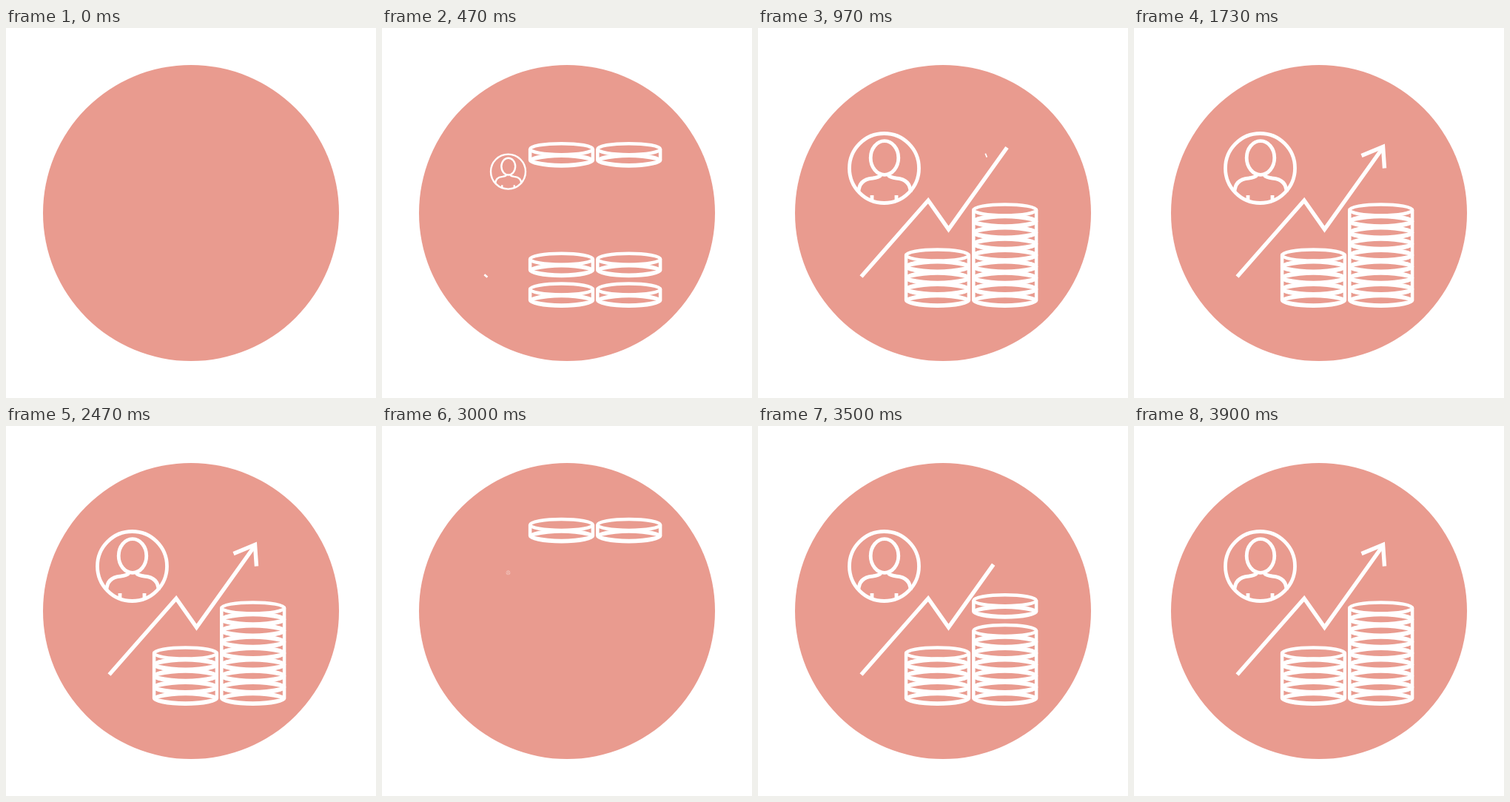
An HTML page with a canvas for the animation above (3.93 s loop, 500x500 px).

```html
<!DOCTYPE html>
<html>
<head>
<meta charset="utf-8">
<title>Growth icon</title>
<style>
html, body { margin: 0; height: 100%; overflow: hidden; background: #fff; }
canvas { display: block; }
</style>
</head>
<body>
<canvas id="stage" width="500" height="500"></canvas>
<script>
const ctx = document.getElementById('stage').getContext('2d');
const LENGTH = 3930;  // the whole loop, ms
const REPLAY = 81;    // the icon starts over after this many ticks of 1/30 s
const PITCH = 15.3, RX = 42.4, RY = 7.5, DROP = 245;

const part = (f, start, len) => Math.min(1, Math.max(0, (f - start) / len));
const smooth = x => x * x * (3 - 2 * x);
const cubic = x => x < .5 ? 4 * x ** 3 : 1 - 4 * (1 - x) ** 3;

function ellipse(x, y, rx, ry) {
  ctx.beginPath();
  ctx.ellipse(x, y, rx, ry, 0, 0, 7);
}

function coin(x, y) {
  const low = y + PITCH;
  ctx.lineWidth = 4.5;
  ellipse(x, y, RX, RY);
  ctx.stroke();
  // lower rim with a pointed slit
  ellipse(x, low, RX + 2.2, RY + 2.2);
  ctx.moveTo(x - 37, low);
  ctx.quadraticCurveTo(x, low - 8, x + 37, low);
  ctx.quadraticCurveTo(x, low + 8, x - 37, low);
  ctx.fill('evenodd');
  ctx.beginPath();
  for (const side of [-RX, RX]) {
    ctx.moveTo(x + side, y);
    ctx.lineTo(x + side, low);
  }
  ctx.stroke();
}

function stack(f, x, count, lastDelay) {
  for (let i = 0; i < count; i++) {
    const start = 8 + 2 * i + (i === count - 1 ? lastDelay : 0);
    if (f > start) coin(x, 353 - i * PITCH - DROP * (1 - smooth(part(f, start, 5))));
  }
}

function avatar(scale) {
  if (!scale) return;
  ctx.save();
  ctx.translate(170.5, 198.7);
  ctx.scale(scale, scale);
  ctx.translate(-170.5, -198.7);
  ctx.lineWidth = 4.8;
  ellipse(170.5, 189.5, 47, 47);
  ctx.stroke();
  ellipse(171, 175.5, 18.8, 22.8);
  ctx.stroke();
  ctx.stroke(new Path2D('M136 222C136 209 144 204 155 203Q163 202 166 199M176 199Q179 202 187 203C198 204 206 209 206 222M154 226V233M187 226V233'));
  ctx.restore();
}

function trace(points, amount) {
  if (!amount) return;
  const legs = points.slice(1).map((p, i) => Math.hypot(p[0] - points[i][0], p[1] - points[i][1]));
  let left = amount * legs.reduce((a, b) => a + b);
  ctx.lineWidth = 5.4;
  ctx.beginPath();
  ctx.moveTo(...points[0]);
  legs.forEach((leg, i) => {
    if (left <= 0) return;
    const k = Math.min(1, left / leg), [x, y] = points[i], [u, v] = points[i + 1];
    ctx.lineTo(x + (u - x) * k, y + (v - y) * k);
    left -= leg;
  });
  ctx.stroke();
}

function draw(ms) {
  const f = Math.floor(ms * .03 + .15) % REPLAY;
  ctx.fillStyle = '#fff';
  ctx.fillRect(0, 0, 500, 500);
  ctx.fillStyle = '#e99b8f';
  ellipse(250, 250, 200, 200);
  ctx.fill();

  ctx.fillStyle = ctx.strokeStyle = '#fff';
  ctx.save();
  ctx.beginPath();
  ctx.rect(0, 120, 500, 380);
  ctx.clip();
  stack(f, 242.5, 4, .6);
  stack(f, 333.7, 8, 0);
  ctx.restore();

  avatar(smooth(part(f, 7, 14)));
  trace([[139.5, 336], [230, 233], [257.5, 272], [336.5, 161.5]], cubic(part(f, 11.8, 17.2)));
  trace([[307.5, 172.5], [336.5, 160.5], [338.5, 189.5]], smooth(part(f, 28.3, 7)));
}

const origin = performance.now();
function tick() {
  draw((performance.now() - origin) % LENGTH);
  requestAnimationFrame(tick);
}
tick();
</script>
</body>
</html>
```
